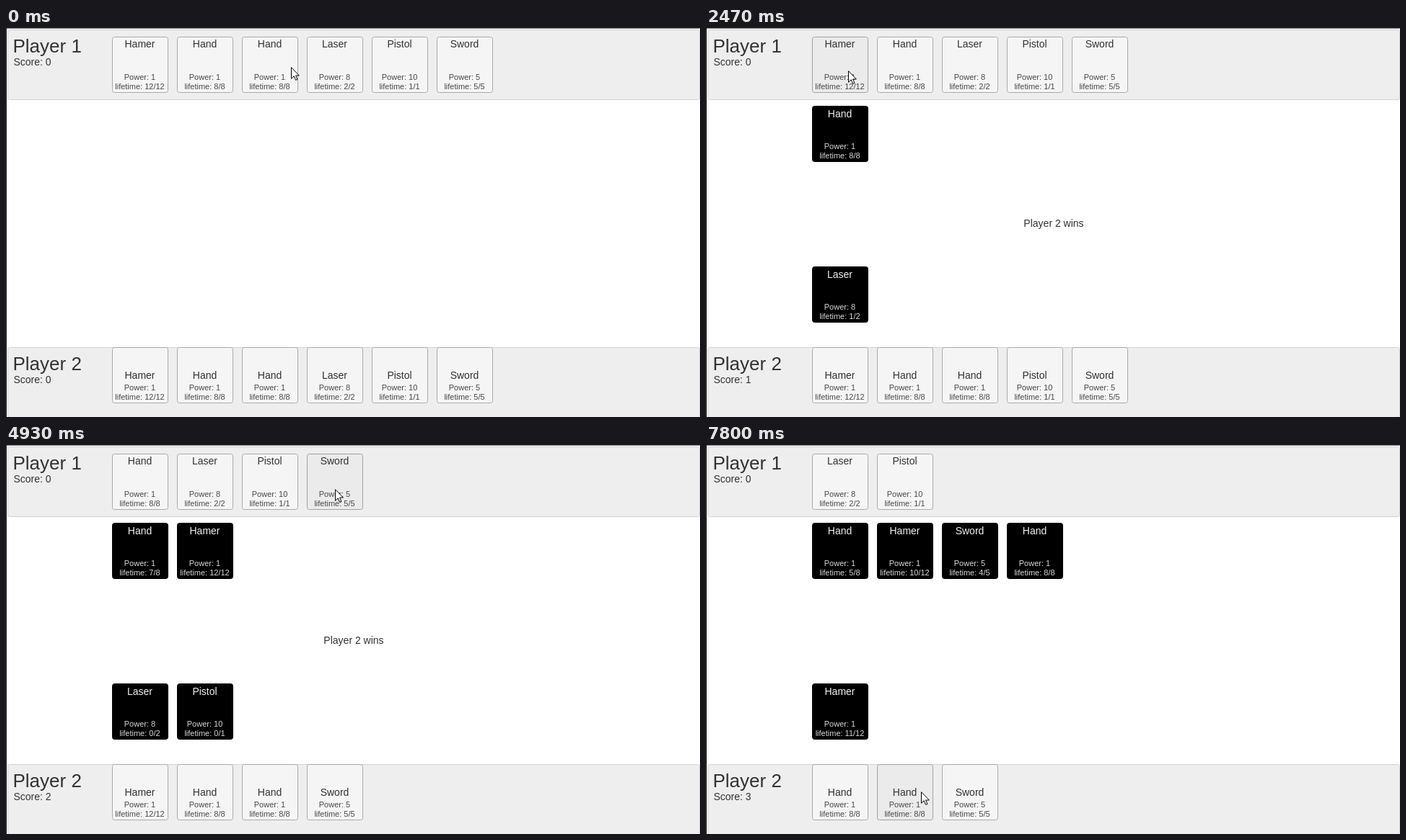
An HTML page for the animation above (8000 ms loop, 962 px wide and 540 px high).

```html
<!DOCTYPE html>
<html lang="en">
<head>
<meta charset="utf-8">
<title>Card duel</title>
<style>
  html, body { margin: 0; width: 100%; height: 100%; overflow: hidden; background: #fff; }
  svg { display: block; width: 962px; height: 540px; }
  text { font: 14px "Liberation Sans", Arial, sans-serif; fill: #323232; }
  .title { font-size: 26px; }
  .stat { font-size: 11px; fill: #484848; }
  .mid { text-anchor: middle; }
  .panel { fill: #eee; stroke: #d2d2d2; }
  .card { fill: #f5f5f5; stroke: #aaa; }
  .hover { fill: #ebebeb; stroke: #a2a2a2; }
  .press { fill: #cacaca; stroke: #949494; }
  .played { fill: #000; stroke: #000; }
  .played ~ text { fill: #f0f0f0; }
  .played ~ .stat { fill: #d8d8d8; }
  .cursor { fill: #fff; stroke: #000; }
</style>
</head>
<body>
<svg viewBox="0 0 962 540">
  <rect width="962" height="540" fill="#fff"/>
  <path d="M0 .5H962" stroke="#777"/>
  <path d="M.5 0V540" stroke="#222"/>
  <rect class="panel" x="2.5" y="2.5" width="959" height="97" rx="3"/>
  <rect class="panel" x="2.5" y="443.5" width="959" height="97" rx="3"/>
  <g id="board"></g>
  <path id="cursor" class="cursor" d="M.5 .7V16.3L4.2 12.8 6.6 18.4 8.9 17.4 6.6 12H11.4Z"/>
</svg>
<script>
const TICKS = 120, TICK_MS = 1000 / 15;
const CARD = 78, PITCH = 90, LEFT = 147;
const HAND_Y = [12, 443], TABLE_Y = [108, 331];

const DECK = [
  ['Hamer', 1, 12], ['Hand', 1, 8], ['Hand', 1, 8],
  ['Laser', 8, 2], ['Pistol', 10, 1], ['Sword', 5, 5]
];

// tick, player, slot in hand; the button is pressed one tick earlier
const PLAYS = [
  [10, 0, 2], [25, 1, 3], [42, 0, 0], [66, 1, 3], [77, 0, 3], [91, 1, 0], [106, 0, 0]
];

// start tick, end tick, x, y, sideways bow
const MOVES = [
  [0, 0, 395, 54], [12, 19, 470, 483], [28, 29, 470, 486], [29, 37, 197, 59],
  [44, 52, 216, 499, 19], [55, 59, 469, 467], [67, 70, 411, 45], [72, 74, 456, 61],
  [78, 84, 244, 436], [84, 88, 193, 467], [92, 96, 172, 38], [113, 117, 298, 481]
];

const board = document.getElementById('board');
const cursor = document.getElementById('cursor');
const alive = card => card.life > 0;
const age = card => { card.life--; };

function stateAt(tick) {
  const state = { score: 0, wins: false, lastPlay: 0, players: [] };
  for (let i = 0; i < 2; i++) {
    const hand = DECK.map(([name, power, max]) => ({ name, power, max, life: max }));
    state.players.push({ hand, table: [] });
  }
  for (const [when, who, slot] of PLAYS) {
    if (when > tick) break;
    const player = state.players[who];
    const [card] = player.hand.splice(slot, 1);
    player.table = player.table.filter(alive);
    if (who === 0) player.table.forEach(age);
    player.table.push(card);
    if (who === 1) {
      player.table.forEach(age);
      state.score++;
    }
    state.wins = who === 1;
    state.lastPlay = when;
  }
  return state;
}

function cursorAt(tick) {
  let x = 0, y = 0, movedAt = 0;
  for (const [start, end, toX, toY, bow = 0] of MOVES) {
    if (tick < start) break;
    const p = end > start ? Math.min(1, (tick - start) / (end - start)) : 1;
    const ease = p * p * (3 - 2 * p);
    x += (toX - x) * ease + bow * Math.sin(Math.PI * p);
    y += (toY - y) * ease;
    movedAt = Math.min(tick, end);
  }
  return { x: Math.round(x), y: Math.round(y), movedAt };
}

const label = (x, y, text, cls = '') => `<text x="${x}" y="${y}" class="${cls}">${text}</text>`;

function drawCard(card, slot, y, cls, nameY, statY) {
  const x = LEFT + slot * PITCH, mid = x + 38.5;
  return `<g><rect class="${cls}" x="${x + .5}" y="${y + .5}" width="${CARD - 1}" height="${CARD - 1}" rx="3"/>` +
    label(mid, y + nameY, card.name, 'mid') +
    label(mid, y + statY, `Power: ${card.power}`, 'mid stat') +
    label(mid, y + statY + 13, `lifetime: ${card.life}/${card.max}`, 'mid stat') + '</g>';
}

function handClass(tick, who, slot, pointer, lastPlay) {
  if (PLAYS.some(p => p[0] === tick + 1 && p[1] === who && p[2] === slot)) return 'card press';
  const dx = pointer.x - LEFT - slot * PITCH, dy = pointer.y - HAND_Y[who];
  const over = dx >= 0 && dx < CARD && dy >= 0 && dy < CARD;
  return over && pointer.movedAt > lastPlay ? 'card hover' : 'card';
}

function draw(tick) {
  const state = stateAt(tick), pointer = cursorAt(tick);
  let out = '';
  state.players.forEach(({ hand, table }, who) => {
    const top = who * 441;
    out += label(9.5, 34 + top, `Player ${who + 1}`, 'title');
    out += label(10.5, 52 + top, `Score: ${who ? state.score : 0}`);
    hand.forEach((card, slot) => {
      const cls = handClass(tick, who, slot, pointer, state.lastPlay);
      out += drawCard(card, slot, HAND_Y[who], cls, who ? 44 : 15, 60);
    });
    table.forEach((card, slot) => {
      out += drawCard(card, slot, TABLE_Y[who], 'played', 16, 60);
    });
  });
  if (state.wins) out += label(482, 276, 'Player 2 wins', 'mid');
  board.innerHTML = out;
  cursor.setAttribute('transform', `translate(${pointer.x} ${pointer.y})`);
}

const origin = performance.now();
let shown = -1;
function frame() {
  const elapsed = performance.now() - origin;
  const tick = Math.floor((elapsed + 4) / TICK_MS) % TICKS;
  if (tick !== shown) draw(shown = tick);
  requestAnimationFrame(frame);
}
frame();
</script>
</body>
</html>
```
